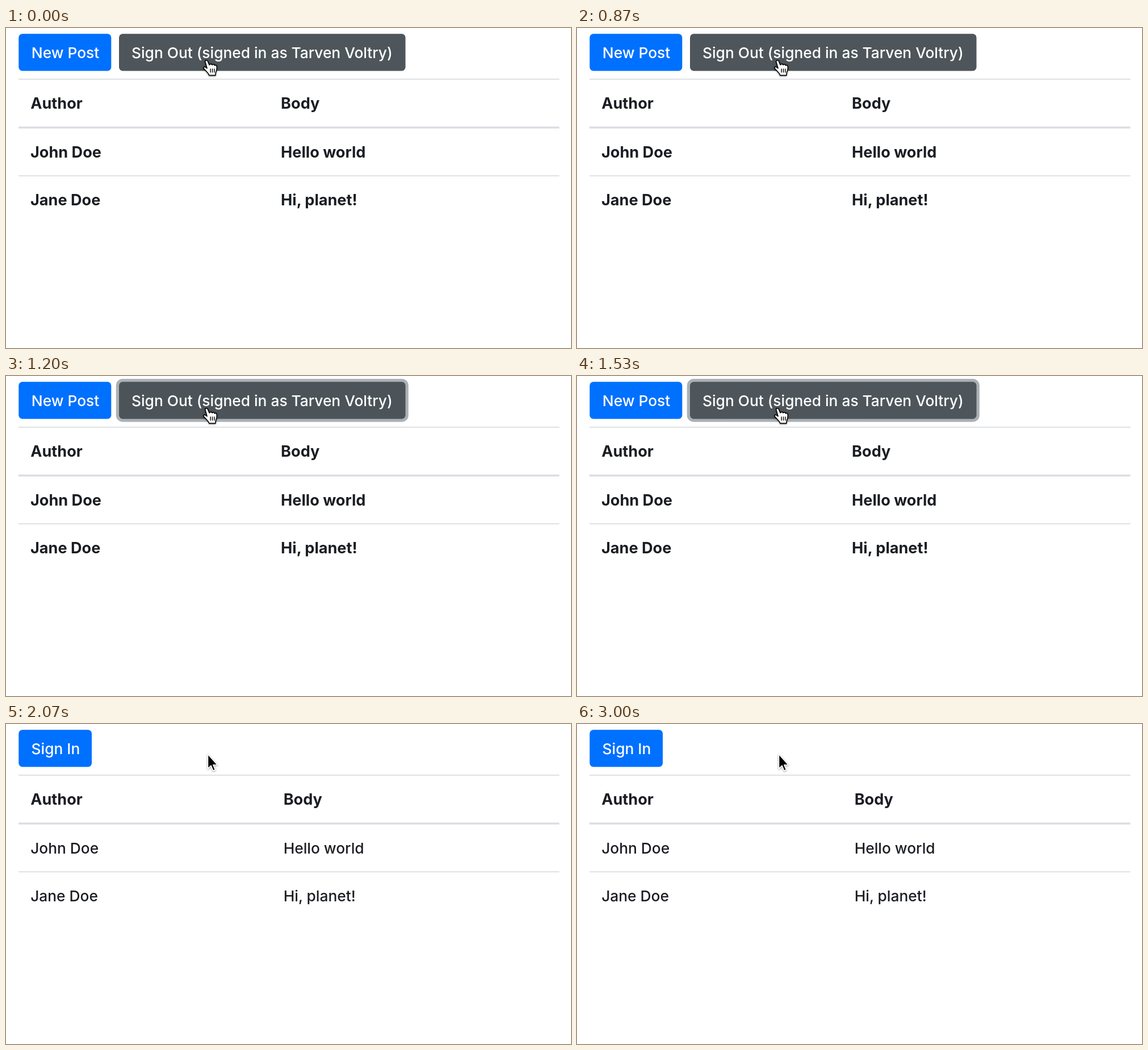
Animation, 995 px wide and 563 px high, one loop 3390 ms. Source, as an HTML page:

```html
<!DOCTYPE html>
<html lang="en">
<head>
<meta charset="utf-8">
<title>Sign out</title>
<style>
  html, body { margin: 0; width: 100%; height: 100%; overflow: hidden; background: #fff; }
  svg { display: block; width: 100vw; height: 100vh; }
  text { font: 450 26.3px Inter, "Liberation Sans", sans-serif; fill: #1a1d22; }
  .bold text, text.bold { font-weight: 700; font-size: 27.1px; }
  text.label { fill: #fff; }
  .line { fill: #dadce2; }
  .primary { fill: #0070ff; }
  .pointer { stroke-linejoin: round; filter: drop-shadow(0 1.5px 1.5px rgba(0, 0, 0, .4)); }
</style>
</head>
<body>
<svg viewBox="0 0 995 563">
  <g class="line">
    <rect x="22" y="89.2" width="952.5" height="1.7"/>
    <rect x="22" y="173.4" width="952.5" height="3.4"/>
    <rect x="22" y="259.2" width="952.5" height="1.7"/>
  </g>
  <text class="bold" x="43.2" y="142">Author</text>

  <g id="signedIn">
    <rect class="primary" x="22.3" y="10.3" width="163" height="65.2" rx="6.5"/>
    <text class="label" x="44.8" y="53">New Post</text>
    <rect id="ring"/>
    <rect id="signOut" x="199" y="10.3" width="504.5" height="65.2" rx="6.5"/>
    <text class="label" x="221" y="53">Sign Out (signed in as Tarven Voltry)</text>
    <g class="bold">
      <text x="484.1" y="142">Body</text>
      <text x="43" y="228">John Doe</text>
      <text x="484.1" y="228">Hello world</text>
      <text x="43" y="312">Jane Doe</text>
      <text x="484.1" y="312">Hi, planet!</text>
    </g>
    <g class="pointer" transform="translate(-.7 .4)" stroke="#000" stroke-width="1.6" stroke-linecap="round">
      <path fill="#fff" d="M351.5 59C351 56 355 55.5 356 58L358.8 64.5C360 62.5 363 62.5 363.8 64.5C365 63 367.6 63.3 368 65.5C370 64.3 372 65.5 372 68C372.5 73 371 76 370 78.5L369.5 83H358.5C358 79.5 353 75.5 349 71C347.5 69 349.5 67 352 68.5L354.8 70.5Z"/>
      <path fill="none" stroke-width="1.4" d="M360.8 71.5V77.5M364.2 71.5V77.5M367.6 71.5V77.5"/>
    </g>
  </g>

  <g id="signedOut">
    <rect class="primary" x="22.3" y="10.3" width="128.7" height="65.2" rx="6.5"/>
    <text class="label" x="44.6" y="53">Sign In</text>
    <text class="bold" x="488.7" y="142">Body</text>
    <text x="43.2" y="228">John Doe</text>
    <text x="488.7" y="228">Hello world</text>
    <text x="43.2" y="312">Jane Doe</text>
    <text x="488.7" y="312">Hi, planet!</text>
    <path class="pointer" stroke="#fff" stroke-width="1.7" d="M355.4 53V78.7L361 73.4L364.7 82.2L368.6 80.6L364.9 72H372.4Z"/>
  </g>
</svg>
<script>
  const LOOP = 3390, PRESS = 1060, RELEASE = 1130, LEAVE = 2070;
  const RING_WIDTH = 5.3, RING_ALPHA = 0.57;
  const [signedIn, signedOut, signOut, ring] =
    ["signedIn", "signedOut", "signOut", "ring"].map(id => document.getElementById(id));

  const clamp = v => Math.min(1, Math.max(0, v));
  const ease = v => v * v * (3 - 2 * v);
  const progress = (t, start, length) => ease(clamp((t - start) / length));

  function setAttributes(element, values) {
    for (const name in values) element.setAttribute(name, values[name]);
  }

  function draw(t) {
    signedIn.style.display = t < LEAVE ? "" : "none";
    signedOut.style.display = t < LEAVE ? "none" : "";

    const focus = progress(t, PRESS, 150);
    const spread = RING_WIDTH * focus;
    setAttributes(ring, {
      x: 199 - spread, y: 10.3 - spread,
      width: 504.5 + 2 * spread, height: 65.2 + 2 * spread, rx: 6.5 + spread,
      fill: `rgba(108, 117, 125, ${RING_ALPHA * focus})`
    });

    const pressed = progress(t, PRESS, 70) - progress(t, RELEASE, 140);
    const shade = [78, 86, 91].map(c => c - 4 * pressed);
    signOut.setAttribute("fill", `rgb(${shade})`);
  }

  function tick() {
    draw(performance.now() % LOOP);
    requestAnimationFrame(tick);
  }
  tick();
</script>
</body>
</html>
```
